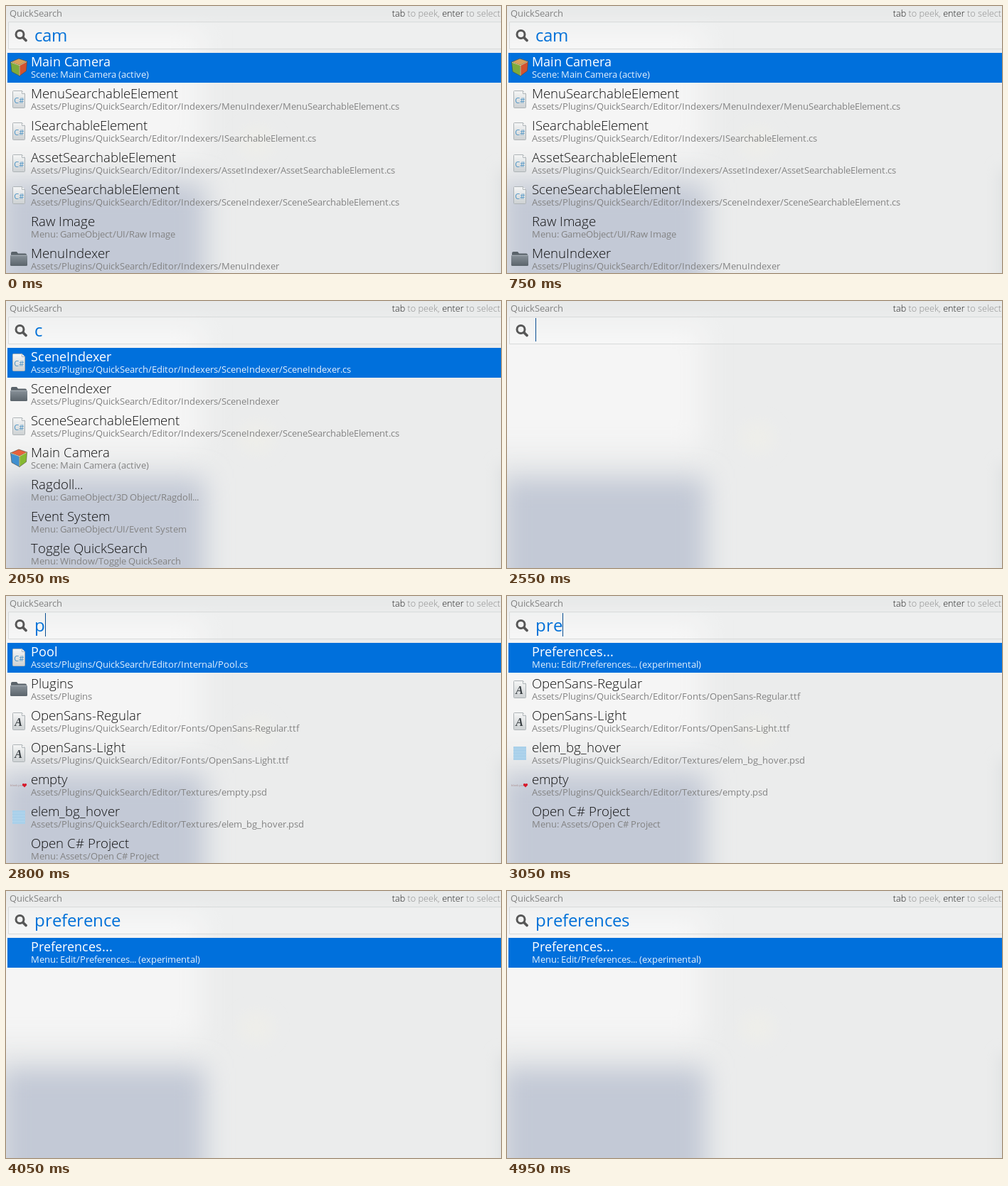
These frames come from a looping animation (696x376 px, 5 s). An HTML page:

```html
<!DOCTYPE html>
<html lang="en">
<head>
<meta charset="utf-8">
<title>Search</title>
<style>
html, body { margin: 0; width: 100%; height: 100%; overflow: hidden; background: #ebecec; }
svg { display: block; width: 696px; height: 376px; font-family: "Open Sans", sans-serif; }
text { white-space: pre; }
.title { font-weight: 300; font-size: 18.6px; fill: #111; }
.sub { font-size: 13px; fill: #838383; }
.sel .title { font-weight: 400; font-size: 18px; fill: #fff; }
.sel .sub { fill: #e4f0fc; }
.row { --top: #e8613c; --left: #3f8fd0; --right: #86b932; }
.sel { --top: #d8a25c; --left: #7dab3c; --right: #d3532f; }
</style>
</head>
<body>
<svg viewBox="0 0 696 376">
  <defs>
    <filter id="soft" x="-50%" y="-50%" width="200%" height="200%"><feGaussianBlur stdDeviation="18"/></filter>
    <filter id="mild" x="-50%" y="-50%" width="200%" height="200%"><feGaussianBlur stdDeviation="10"/></filter>
    <linearGradient id="paper" x2="0" y2="1"><stop stop-color="#f5f6f6"/><stop offset="1" stop-color="#cdd1d3"/></linearGradient>
    <linearGradient id="steel" x2="0" y2="1"><stop stop-color="#89929a"/><stop offset="1" stop-color="#5b646b"/></linearGradient>
    <g id="page">
      <path d="M10.500 8.500H22.500L26.500 12.500V31.500Q26.500 32.500 25.500 32.500H10.500Q9.500 32.500 9.500 31.500V9.500Q9.500 8.500 10.500 8.500Z" fill="url(#paper)" stroke="#adb3b6"/>
      <path d="M22.500 8.500V12.500H26.500" fill="#fff" stroke="#adb3b6"/>
    </g>
    <g id="cs"><use href="#page"/><text x="18.300" y="26" text-anchor="middle" font-size="11" fill="#4a92c4">C#</text></g>
    <g id="font"><use href="#page"/><text x="17.600" y="27" text-anchor="middle" font-size="16" font-weight="700" font-style="italic" font-family="Liberation Serif, serif" fill="#3b4145">A</text></g>
    <g id="folder">
      <path d="M7 12Q7 10 9 10H15L17 12.500H27Q29 12.500 29 14.500V20H7Z" fill="#5a636a"/>
      <rect x="6" y="14.500" width="24" height="15.500" rx="1.500" fill="url(#steel)"/>
      <path d="M7 15.500H29" stroke="#a2aab0"/>
    </g>
    <g id="cube" stroke="#4a4a3c" stroke-width=".6" stroke-linejoin="round">
      <path d="M18 8L29.500 12L19 17.500L6.500 13Z" fill="var(--top)"/>
      <path d="M6.500 13L19 17.500V32.500L8 26.500Z" fill="var(--left)"/>
      <path d="M29.500 12L19 17.500V32.500L28.500 25.500Z" fill="var(--right)"/>
      <path d="M7 13.300L19 17.700L29 12.400M19 17.700V32" fill="none" stroke="#f3e3b0" stroke-width=".8"/>
    </g>
    <g id="heart">
      <text x="6" y="22" font-size="4" fill="#a98c8c">blank psd</text>
      <path d="M26 23.500L22.800 20.300Q22.800 18 24.500 18Q25.700 18 26 19Q26.300 18 27.500 18Q29.200 18 29.200 20.300Z" fill="#d8182a"/>
    </g>
    <g id="tile"><rect x="9" y="11" width="18" height="19" fill="#a9d0ea"/><path d="M9 14.500H27M9 18.500H27M9 22.500H27M9 26.500H27" stroke="#b9daef" stroke-dasharray="1 1"/></g>
    <g id="none"></g>
  </defs>

  <rect width="696" height="376" fill="#ebecec"/>
  <rect x="-60" y="34" width="335" height="176" fill="#f5f5f5" filter="url(#soft)"/>
  <rect x="-60" y="-30" width="820" height="44" fill="#e7e9e9" filter="url(#mild)"/>
  <rect x="-8" y="249" width="288" height="220" fill="#c3c9d6" filter="url(#soft)"/>
  <rect x="692" y="230" width="60" height="190" fill="#dfe1e2" filter="url(#mild)"/>
  <ellipse cx="352" cy="192" rx="24" ry="22" fill="#eeeeea" filter="url(#mild)"/>

  <text id="head" class="sub" y="15"></text>
  <text x="695" y="15" text-anchor="end" font-size="12.700" font-weight="300" fill="#8c8c8c"><tspan fill="#222">tab</tspan> to peek, <tspan fill="#222">enter</tspan> to select</text>
  <path d="M697 22.500H3.500V60.500H697" fill="#fff" fill-opacity=".15" stroke="#d8dada"/>
  <g fill="none" stroke="#575757"><circle cx="19.500" cy="40" r="5.500" stroke-width="3"/><path d="M24 44.500L28 48.500" stroke-width="3.800" stroke-linecap="round"/></g>
  <text id="query" y="50" font-size="24" fill="#0070d8"></text>
  <rect id="caret" y="24" width="1" height="33" fill="#0b4f92"/>
  <g id="list"></g>
</svg>
<script>
const root = 'Assets/Plugins/QuickSearch/Editor/';
const script = (dir, name) => ['cs', name, `${root}${dir}/${name}.cs`];
const face = name => ['font', 'OpenSans-' + name, `${root}Fonts/OpenSans-${name}.ttf`];
const image = (icon, name) => [icon, name, `${root}Textures/${name}.psd`];
const menu = (dir, name) => ['none', name, `Menu: ${dir}/${name}`];

const items = {
  cam: ['cube', 'Main Camera', 'Scene: Main Camera (active)'],
  menuEl: script('Indexers/MenuIndexer', 'MenuSearchableElement'),
  iEl: script('Indexers', 'ISearchableElement'),
  assetEl: script('Indexers/AssetIndexer', 'AssetSearchableElement'),
  sceneEl: script('Indexers/SceneIndexer', 'SceneSearchableElement'),
  sceneIx: script('Indexers/SceneIndexer', 'SceneIndexer'),
  sceneDir: ['folder', 'SceneIndexer', root + 'Indexers/SceneIndexer'],
  menuDir: ['folder', 'MenuIndexer', root + 'Indexers/MenuIndexer'],
  raw: menu('GameObject/UI', 'Raw Image'),
  align: menu('GameObject', 'Align With View'),
  skin: menu('Assets/Create', 'GUI Skin'),
  ragdoll: menu('GameObject/3D Object', 'Ragdoll...'),
  event: menu('GameObject/UI', 'Event System'),
  toggle: menu('Window', 'Toggle QuickSearch'),
  pool: script('Internal', 'Pool'),
  plugins: ['folder', 'Plugins', 'Assets/Plugins'],
  regular: face('Regular'),
  light: face('Light'),
  semi: face('Semibold'),
  empty: image('heart', 'empty'),
  hover: image('tile', 'elem_bg_hover'),
  project: menu('Assets', 'Open C# Project'),
  prefs: ['none', 'Preferences...', 'Menu: Edit/Preferences... (experimental)']
};

// start in ms, query, caret shown, results
const steps = [
  [0, 'cam', 0, 'cam menuEl iEl assetEl sceneEl raw menuDir'],
  [1600, 'ca', 1, 'cam assetEl iEl menuEl sceneEl align skin'],
  [1900, 'c', 1, 'sceneIx sceneDir sceneEl cam ragdoll event toggle'],
  [2000, 'c', 0, 'sceneIx sceneDir sceneEl cam ragdoll event toggle'],
  [2250, '', 1, ''],
  [2800, 'p', 1, 'pool plugins regular light empty hover project'],
  [2900, 'pr', 1, 'prefs regular light hover empty project plugins'],
  [3000, 'pre', 1, 'prefs regular light hover empty project'],
  [3100, 'pref', 1, 'prefs regular light semi'],
  [3200, 'prefe', 1, 'prefs regular light semi'],
  [3350, 'prefer', 0, 'prefs regular'],
  [3500, 'prefere', 0, 'prefs regular'],
  [3700, 'preferen', 0, 'prefs'],
  [3900, 'preferenc', 0, 'prefs'],
  [4000, 'preference', 0, 'prefs'],
  [4150, 'preferences', 0, 'prefs']
];

const $ = id => document.getElementById(id);
const pen = document.createElement('canvas').getContext('2d');

// Start of each letter, and the end, with advances rounded to whole pixels.
function stops(text, x, font) {
  pen.font = font + ' "Open Sans", sans-serif';
  const list = [x];
  for (const c of text) list.push(x += Math.round(pen.measureText(c).width));
  return list;
}

const line = (name, y, text, font) =>
  `<text class="${name}" x="${stops(text, 35, font).join(' ')}" y="${y}">${text}</text>`;

function row(key, i) {
  const [icon, title, sub] = items[key];
  const bar = i ? '' : '<rect x="2" width="694" height="42" fill="#0070dc"/>';
  return `<g transform="translate(0 ${66 + 45 * i})" class="row ${i ? '' : 'sel'}">${bar}<use href="#${icon}"/>` +
    line('title', 19, title, i ? '300 18.6px' : '18px') + line('sub', 35, sub, '13px') + '</g>';
}

function write(id, text, x, font) {
  const list = stops(text, x, font);
  $(id).textContent = text;
  $(id).setAttribute('x', list.join(' '));
  return list.pop();
}

let shown;
function draw(ms) {
  const step = steps.filter(s => s[0] <= ms).pop();
  if (step === shown) return;
  shown = step;
  const [, query, caret, keys] = step;
  $('caret').setAttribute('x', write('query', query, 40, '24px'));
  $('caret').setAttribute('opacity', caret);
  $('list').innerHTML = keys.split(' ').filter(Boolean).map(row).join('');
}

write('head', 'QuickSearch', 5, '13px');
const start = performance.now();
function tick() {
  draw((performance.now() - start) % 5000);
  requestAnimationFrame(tick);
}
tick();
</script>
</body>
</html>
```
